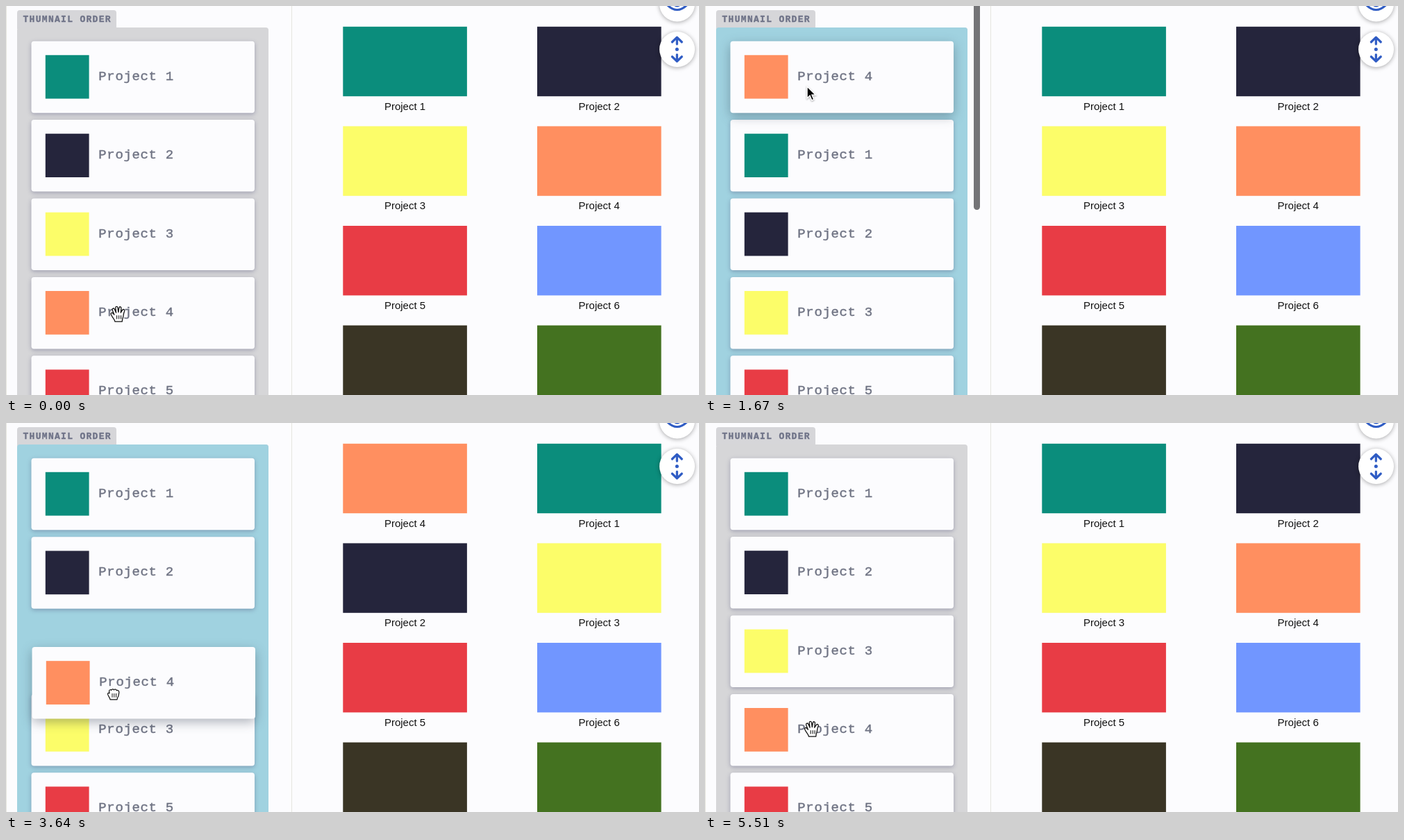
An HTML page for the animation above (5.55 s loop, 998x561 px).

```html
<!DOCTYPE html>
<html lang="en">
<head>
<meta charset="utf-8">
<title>Thumbnail order</title>
<style>
  html, body { margin: 0; width: 100%; height: 100%; overflow: hidden; background: #fcfcfe; }
  svg { display: block; width: 100vw; height: 100vh; }
  .tab { font: bold 13px "Liberation Mono", monospace; letter-spacing: 1.3px; fill: #6e7287; stroke: #6e7287; stroke-width: .35px; }
  .name { font: 19px "Liberation Mono", monospace; letter-spacing: .65px; fill: #717585; stroke: #717585; stroke-width: .45px; }
  .caption { font: 15px "Liberation Sans", Arial, sans-serif; text-anchor: middle; fill: #111; }
  .card { filter: drop-shadow(0 2px 3px rgba(60, 60, 105, .36)); }
  .card.lifted { filter: drop-shadow(0 5px 8px rgba(30, 40, 60, .34)); }
  .button { filter: drop-shadow(0 1px 3px rgba(0, 0, 0, .34)); }
  .icon { fill: none; stroke: #2f5cc4; stroke-width: 3.2; stroke-linecap: round; stroke-linejoin: round; }
  .hand { fill: #fff; stroke: #111; stroke-width: 1.2; stroke-linejoin: round; stroke-linecap: round; }
  .arrow { fill: #000; stroke: #fff; stroke-width: 1.5; filter: drop-shadow(0 1px 1px rgba(0, 0, 0, .35)); }
</style>
</head>
<body>
<svg viewBox="0 0 998 561" preserveAspectRatio="none">
  <path d="M.5 0V561M411.5 0V561" stroke="#e6e6df"/>
  <g id="panel">
    <path d="M16 33V10a4 4 0 0 1 4-4H155a4 4 0 0 1 4 4V33Z" fill="#d6d6d9"/>
    <rect x="16" y="31" width="362" height="600" rx="4" fill="#d6d6d8"/>
    <rect id="over" x="16" y="31" width="362" height="600" rx="4" fill="#a0d2e0"/>
    <text class="tab" x="24.5" y="22.5">THUMNAIL ORDER</text>
  </g>
  <g id="cards"></g>
  <rect id="bar" x="387" y="-20" width="9" height="314" rx="4.5" fill="#747477"/>
  <g id="grid"></g>
  <circle class="button" cx="966.5" cy="-3" r="25.5" fill="#fff"/>
  <path class="icon" d="M950-4Q966.5 15 983-4"/>
  <circle cx="966.5" cy="-5" r="6.5" fill="#2f5cc4"/>
  <circle class="button" cx="966.5" cy="62.5" r="25.5" fill="#fff"/>
  <path class="icon" d="M966.3 55V46M959.3 52L966.3 45.2L973.3 52M966.3 70V79.5M959.3 73L966.3 79.8L973.3 73"/>
  <circle cx="966.3" cy="62.6" r="2.5" fill="#2f5cc4"/>
  <g id="cursor">
    <g id="open" class="hand" transform="translate(.8 .4) scale(1.08)">
      <path d="M-4.5 10C-5 7-10 2-10-.5C-9.8-2.5-7-2.3-5.5.8L-8-5.5C-8.5-8-5.8-8.6-5-6.5L-3-2L-3.8-8.5C-3.8-10.8-1.2-10.8-.8-8.5L0-2.5L1-8.5C1.5-10.5 4-10.2 3.8-8L3.2-2L5.5-5.5C6.8-7.3 9-6 8.2-4C6 1 7 4 5.5 6.5L5 10Z"/>
      <path d="M-2 2V6M.8 2V6M3.5 2V6" stroke-width="1"/>
    </g>
    <g id="fist" class="hand">
      <path d="M-5 8.5C-5 6-9 2.5-8.5 0C-8-1.5-6.5-1-6-.5L-6.5-3.5C-6.5-6-4-6.2-3.2-5C-2.5-7 0-7 .5-5.4C1.5-7 4-6.5 4.2-4.6C6-5.5 8-4.2 7.8-2C7.5 1 7 4 5.5 6L5 8.5Z"/>
      <path d="M-2 0V5M.8 0V5M3.6 0V5" stroke-width="1"/>
    </g>
    <path id="arrow" class="arrow" d="M0 0V17L4 13.3L6.8 20L9.8 18.7L7 12.2H12.4Z"/>
  </g>
</svg>
<script>
const LOOP = 5550, LEFT = 36.5, TOP = 50.7, PITCH = 113.4, SETTLE = 380;
const colors = ['#0b8d7c', '#25253c', '#fcfd69', '#ff8f60', '#e83c45', '#7196ff', '#3a3525', '#447220'];
const $ = id => document.getElementById(id);
const clamp = v => Math.max(0, Math.min(1, v));
const ramp = (t, from, length) => clamp((t - from) / length);
const easeOut = (p, power) => 1 - (1 - p) ** power;
const slotY = i => TOP + i * PITCH;

// time, x, y of the pointer
const path = [
  [0, 161, 444], [230, 162, 446], [450, 168, 415], [730, 178, 335], [1000, 167, 215],
  [1220, 151, 128], [1350, 147, 116], [1900, 147, 116], [2500, 153, 106], [2800, 153, 106],
  [2990, 154, 118], [3200, 154, 168], [3480, 154, 293], [3640, 155, 390], [3800, 155, 432],
  [3930, 155, 443], [4400, 155, 443], [5000, 153.5, 441], [5550, 153.5, 441]
];
const drags = [
  { grab: 260, drop: 1350, from: 3, to: 0 },
  { grab: 2990, drop: 3970, from: 0, to: 3 }
];

function slope(i, k) {
  const a = path[i - 1], b = path[i], c = path[i + 1];
  if (!a || !c) return 0;
  const l = (b[k] - a[k]) / (b[0] - a[0]), r = (c[k] - b[k]) / (c[0] - b[0]);
  return l * r > 0 ? 2 * l * r / (l + r) : 0;
}

function pointer(t) {
  let i = 0;
  while (i < path.length - 2 && t >= path[i + 1][0]) i++;
  const a = path[i], b = path[i + 1], d = b[0] - a[0], u = (t - a[0]) / d, v = 1 - u;
  return [1, 2].map(k =>
    v * v * (1 + 2 * u) * a[k] + u * u * (3 - 2 * u) * b[k] +
    d * u * v * (v * slope(i, k) - u * slope(i + 1, k)));
}

function held(drag, t) {
  const [x0, y0] = pointer(drag.grab), [x, y] = pointer(t);
  return [LEFT + x - x0, slotY(drag.from) + y - y0];
}

// moment at which the dragged card pushes a neighbour aside
function crossing(drag, passed) {
  let t = drag.grab;
  while (t < drag.drop && !passed(held(drag, t)[1])) t += 2;
  return t;
}
const pushes = [0, 1, 2].map(i => [
  crossing(drags[0], y => y < slotY(i) + 52),
  crossing(drags[1], y => y > slotY(i + 1) - 51)
]);

function draggedAt(t) {
  const drag = t < drags[1].grab ? drags[0] : drags[1];
  if (t < drag.grab) return [LEFT, slotY(drag.from)];
  if (t < drag.drop) return held(drag, t);
  const p = easeOut(ramp(t, drag.drop, SETTLE), 5), [x, y] = held(drag, drag.drop);
  return [x + (LEFT - x) * p, y + (slotY(drag.to) - y) * p];
}

function cardMarkup(i) {
  return `<g class="card"><rect width="321.5" height="103.5" rx="4" fill="#fcfcfe"/>
    <rect x="20.3" y="20.1" width="62.8" height="62.8" fill="${colors[i]}"/>
    <text class="name" x="96.8" y="56">Project ${i + 1}</text></g>`;
}
$('cards').innerHTML = [0, 1, 2, 4, 3].map(cardMarkup).join('');
const [one, two, three, five, moving] = $('cards').children;
const fixed = [one, two, three];

$('grid').innerHTML = colors.map((c, i) => {
  const x = 485.3 + i % 2 * 279.7, y = 29.8 + (i >> 1) * 143.6;
  return `<g><rect x="${x}" y="${y}" width="178.6" height="100.4"/>
    <text class="caption" x="${x + 89.2}" y="${y + 119.8}"></text></g>`;
}).join('');
const tiles = [...$('grid').children];

const place = (el, x, y) => el.setAttribute('transform', `translate(${x.toFixed(2)} ${y.toFixed(2)})`);
const show = (id, on) => $(id).setAttribute('visibility', on ? 'visible' : 'hidden');

function draw(t) {
  const scroll = -1.3 * (ramp(t, 440, 100) - ramp(t, 1150, 120));
  place($('panel'), 0, scroll);
  fixed.forEach((card, i) => {
    const [down, up] = pushes[i].map(at => easeOut(ramp(t, at, 200), 4));
    place(card, LEFT, slotY(i + down - up) + scroll);
  });
  place(five, LEFT, slotY(4) + scroll);

  const [x, y] = draggedAt(t);
  place(moving, x, y);
  const lifted = drags.some(d => t >= d.grab && t < d.drop + SETTLE);
  moving.classList.toggle('lifted', lifted);

  const tint = drags.reduce((sum, d) =>
    sum + ramp(t, d.grab, 160) - ramp(t, d.drop + SETTLE, 160), 0);
  $('over').setAttribute('opacity', tint);
  $('bar').setAttribute('opacity', ramp(t, 450, 60) - ramp(t, 2000, 250));

  const order = t >= 1800 && t < 4410 ? [3, 0, 1, 2, 4, 5, 6, 7] : [0, 1, 2, 3, 4, 5, 6, 7];
  tiles.forEach((tile, i) => {
    tile.firstElementChild.setAttribute('fill', colors[order[i]]);
    tile.lastElementChild.textContent = `Project ${order[i] + 1}`;
  });

  const fist = drags.some(d => t >= d.grab && t < d.drop) || t >= 3970 && t < 4070;
  const arrow = t >= 1350 && t < 1800 || t >= 4070 && t < 4350;
  show('fist', fist);
  show('arrow', arrow);
  show('open', !fist && !arrow);
  place($('cursor'), ...pointer(t));
}

const start = performance.now();
function tick() {
  draw((performance.now() - start) % LOOP);
  requestAnimationFrame(tick);
}
tick();
</script>
</body>
</html>
```
